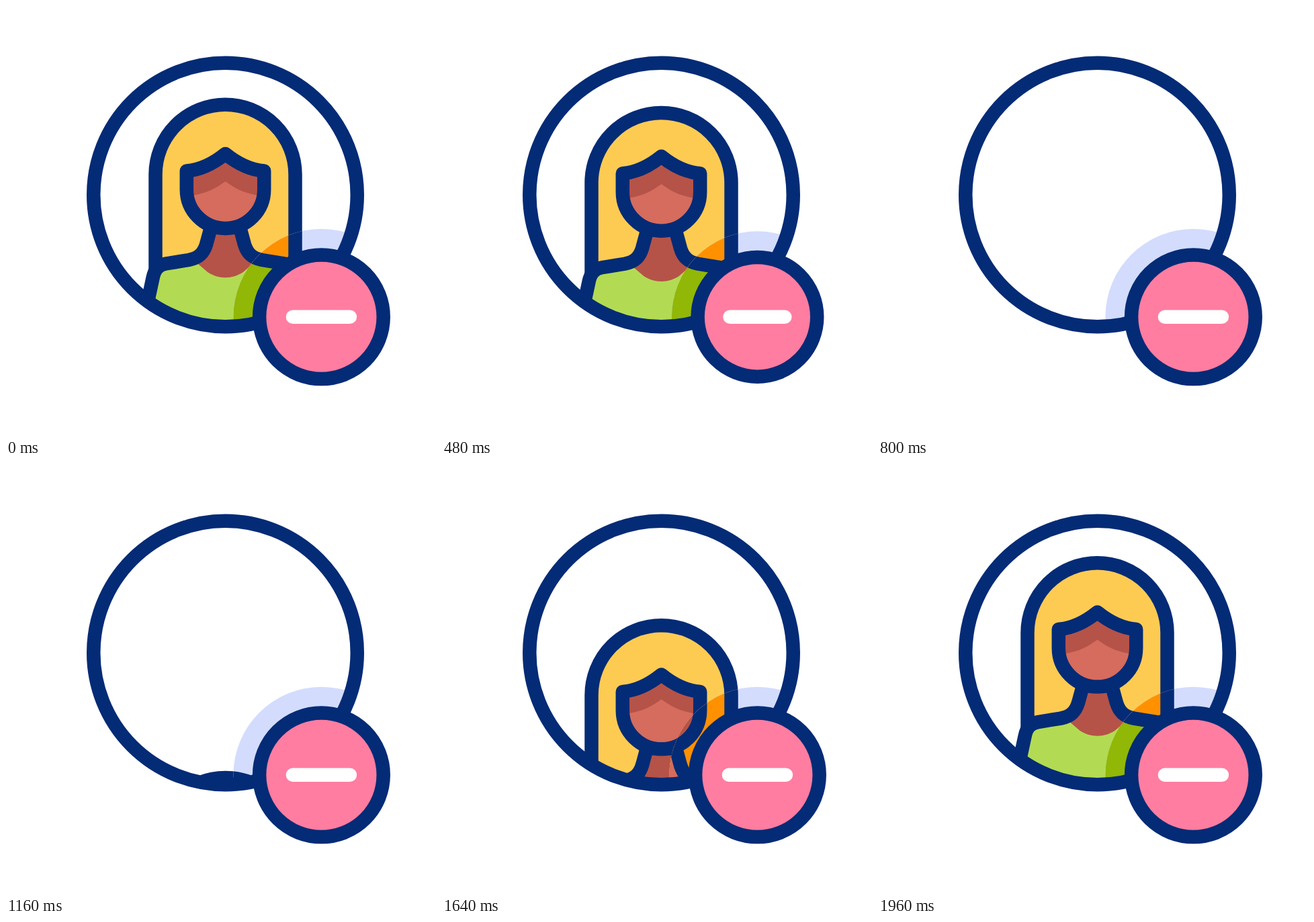
Recreate the animation shown at these times as an HTML page. Size 640x640 px, loop 2000 ms.

```html
<!DOCTYPE html>
<html lang="en">
<head>
<meta charset="utf-8">
<title>Remove user</title>
<style>
  html, body { margin: 0; width: 100%; height: 100%; overflow: hidden; background: #fff; }
  svg { display: block; width: 100vw; height: 100vh; }
  .line { stroke: #042b76; stroke-width: 20.5; stroke-linejoin: round; }
  .plain { --back: #fff; --hair: #fecb52; --top: #b2db53; --skin: #d56c5d; --shade: #b55348; }
  .tinted { --back: #d3dcfd; --hair: #ff9100; --top: #91b707; --skin: #b55348; --shade: #d56c5d; }
</style>
</head>
<body>
<svg viewBox="0 0 640 640">
  <defs>
    <clipPath id="frame"><circle cx="326.5" cy="281" r="196.25"/></clipPath>
    <clipPath id="halo"><circle id="haloDisc" cx="469.4" cy="462.8" r="131"/></clipPath>
    <g id="scene">
      <rect width="640" height="640" fill="var(--back)"/>
      <g id="person">
        <path class="line" fill="var(--hair)" d="M222.5 395V250.75A104 104 0 0 1 430.5 250.75V395"/>
        <g id="body">
          <path id="torso" fill="var(--top)" d="M203 480L212.5 433L218.5 405C221 392 227 385.500 238 383.500L272 378C287 375 294 368 298 355L304 333H349L355 355C359 368 366 375 381 378L415 383.500C426 385.500 432 392 434.500 405L440.500 433L450 480Z"/>
          <path fill="var(--shade)" d="M304 333L298 355C294 368 287 375 272 378L286 384L300 396C316 407 337 407 353 396L367 384L381 378C366 375 359 368 355 355L349 333Z"/>
          <path class="line" fill="none" d="M203 480L212.5 433L218.5 405C221 392 227 385.500 238 383.500L272 378C287 375 294 368 298 355L304 333M349 333L355 355C359 368 366 375 381 378L415 383.500C426 385.500 432 392 434.500 405L440.500 433L450 480"/>
        </g>
        <g id="face">
          <path fill="var(--skin)" d="M268.800 245.500C288 244 308 235 326.500 220C345 235 365 244 384.200 245.500V273.300A57.700 57.700 0 0 1 268.800 273.300Z"/>
          <path id="shadow" fill="var(--shade)" d="M269 283C292 281 309 274 326.500 261C344 274 361 281 384 283V252L326.500 228L269 252Z"/>
          <path class="line" fill="none" d="M268.800 245.500C288 244 308 235 326.500 220C345 235 365 244 384.200 245.500V273.300A57.700 57.700 0 0 1 268.800 273.300Z"/>
        </g>
      </g>
    </g>
  </defs>
  <g clip-path="url(#frame)">
    <use href="#scene" class="plain"/>
    <g clip-path="url(#halo)"><use href="#scene" class="tinted"/></g>
  </g>
  <circle class="line" cx="326.5" cy="281" r="196.25" fill="none"/>
  <circle id="badge" class="line" cx="469.4" cy="462.8" r="92.3" fill="#ff7da0"/>
  <path id="minus" fill="none" stroke="#fff" stroke-width="20.5" stroke-linecap="round"/>
</svg>
<script>
  const LOOP = 2000, CX = 469.4, CY = 462.8;
  const $ = id => document.getElementById(id);
  const ease = u => u * u * (3 - 2 * u);

  // Eased value through [time, value] keys
  function track(t, keys) {
    if (t <= keys[0][0]) return keys[0][1];
    for (let i = 1; i < keys.length; i++) {
      const [a, from] = keys[i - 1], [b, to] = keys[i];
      if (t < b) return from + (to - from) * ease((t - a) / (b - a));
    }
    return keys[keys.length - 1][1];
  }

  const personKeys = [[120, 0], [425, -4.5], [855, 356], [960, 356], [1985, 0]];
  const faceKeys = [[120, 0], [425, -8.5], [860, -8.5], [950, 0]];
  const bodyKeys = [[120, 0], [425, -6.5], [860, -6.5], [950, 0]];
  const shadowKeys = [[425, 0], [855, 4], [900, 4], [960, -16], [1985, 0]];
  const pressKeys = [[120, 1], [360, 0.924], [600, 1]];

  const shift = (id, y) => $(id).setAttribute('transform', `translate(0 ${y.toFixed(3)})`);

  function draw(t) {
    shift('person', track(t, personKeys));
    shift('face', track(t, faceKeys));
    shift('body', track(t, bodyKeys));
    shift('shadow', track(t, shadowKeys));

    // Line weights stay constant while the badge is pressed
    const scale = track(t, pressKeys), r = 92.3 * scale, half = 42.5 * scale;
    $('badge').setAttribute('r', r);
    $('haloDisc').setAttribute('r', r + 38.7);
    $('minus').setAttribute('d', `M${CX - half} ${CY}H${CX + half}`);
  }

  const start = performance.now();
  function tick() {
    draw((performance.now() - start) % LOOP);
    requestAnimationFrame(tick);
  }
  draw(0);
  requestAnimationFrame(tick);
</script>
</body>
</html>
```
